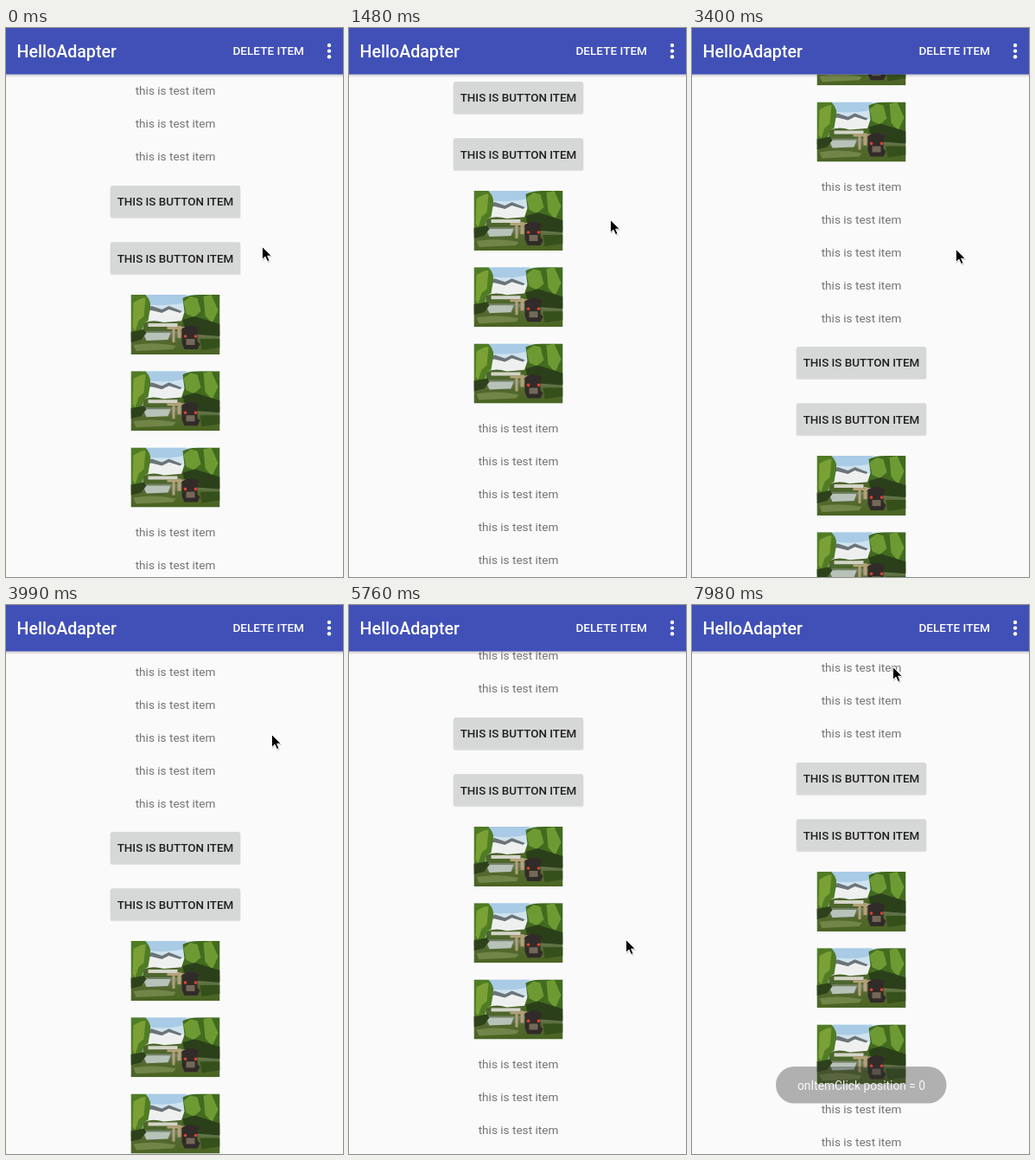
These frames come from a looping animation (390x634 px, 8 s). An HTML page:

```html
<!DOCTYPE html>
<html lang="en">
<head>
<meta charset="utf-8">
<title>HelloAdapter</title>
<style>
html, body { margin: 0; width: 100%; height: 100%; overflow: hidden; background: #fafafa; }
svg { display: block; width: 390px; height: 634px; font-family: Roboto, sans-serif; }
.item { font-size: 13.6px; fill: #747474; text-anchor: middle; }
.btn { font-size: 13.4px; font-weight: 500; fill: #1f1f1f; text-anchor: middle; }
</style>
</head>
<body>
<svg viewBox="0 0 390 634">
  <defs>
    <linearGradient id="shade" x2="0" y2="1">
      <stop offset="0" stop-color="#000" stop-opacity=".2"/>
      <stop offset="1" stop-color="#000" stop-opacity="0"/>
    </linearGradient>
    <linearGradient id="water" x2="0" y2="1">
      <stop offset="0" stop-color="#75836a"/>
      <stop offset=".4" stop-color="#53682f"/>
      <stop offset="1" stop-color="#4a6422"/>
    </linearGradient>
    <clipPath id="frame"><path d="M0 0h103v69h-103z"/></clipPath>
    <clipPath id="page"><path d="M0 53.5h390v581h-390z"/></clipPath>
    <g id="photo" clip-path="url(#frame)">
      <path d="M0 0h103v69h-103z" fill="#cfe2ee"/>
      <path d="M18 0h46v9q-22 5-46 2z" fill="#a9cbe6"/>
      <path d="M16 19l8-5 12 3 8-4 20 9v14h-48z" fill="#eef0f0"/>
      <path d="M17 19l7-6 12 4 8-4 15 6-2 2-13-4-8 4-12-3z" fill="#6b7478"/>
      <path d="M14 33q10-5 24-1l24-2v13h-48z" fill="#4d662c"/>
      <path d="M20 33h34v4h-34z" fill="#d3d4c8"/>
      <path d="M0 42h103v27h-103z" fill="url(#water)"/>
      <path d="M14 44h32l-3 8-25 1z" fill="#b8c2b9"/>
      <path d="M0 0h17q8 9 5 18l-2 12-5 3-4 14-11 2z" fill="#507c24"/>
      <path d="M3 9q10-6 14-5l-2 21-6 5-4 12-3-4z" fill="#7ba036"/>
      <path d="M0 43l15-3 3 4-6 8-12 3z" fill="#2d421a"/>
      <path d="M60 4q7-4 20-4h23v46h-41l-4-14 4-12z" fill="#426b1f"/>
      <path d="M61 8l8-6 8 2 4 15-8 7-9-4zM84 2l9-2 8 18-7 15-8-9z" fill="#6e9a33"/>
      <path d="M60 29l14-4 29 9v14l-40-3z" fill="#2b401a"/>
      <path d="M42 37h22v3h-22zM48 38h3v17h-3zM54 36h4v14h-4z" fill="#b3a079"/>
      <path d="M59 39q10-7 20 0l-2 4v11l3 3-3 6h-15l-3-7z" fill="#312b29"/>
      <path d="M64 51h10v7h-10z" fill="#746858"/>
      <circle cx="63" cy="48" r="1.8" fill="#dc4530"/>
      <circle cx="75" cy="48" r="1.8" fill="#dc4530"/>
      <path d="M80 51h23v10l-21 3z" fill="#36501b"/>
      <path d="M3 58q24-4 49 1l-3 4-43 2z" fill="#728548"/>
    </g>
  </defs>
  <rect width="390" height="634" fill="#fafafa"/>
  <g clip-path="url(#page)">
    <g id="list"></g>
    <path id="topGlow" fill="#3f51b5"/>
    <path id="endGlow" fill="#3f51b5"/>
  </g>
  <rect y="53" width="390" height="4.5" fill="url(#shade)"/>
  <rect width="390" height="53.5" fill="#4150b7"/>
  <g fill="#fff" font-weight="500">
    <text x="12.5" y="34" font-size="19.6">HelloAdapter</text>
    <text x="345" y="31.3" font-size="13.6" text-anchor="end">DELETE ITEM</text>
    <circle cx="374" cy="20" r="2.2"/>
    <circle cx="374" cy="26.6" r="2.2"/>
    <circle cx="374" cy="33.2" r="2.2"/>
  </g>
  <g id="toast" visibility="hidden">
    <rect x="97" y="533" width="197.5" height="42.5" rx="21.2" fill="#323232" fill-opacity=".37"/>
    <text x="196" y="560" font-size="13.8" fill="#fff" fill-opacity=".9" text-anchor="middle">onItemClick position = 0</text>
  </g>
  <g id="cursor">
    <path d="M1 1.5v15.5l3.7-3.3 2.6 5.6 2.6-1.2-2.5-5.3h5z" opacity=".18"/>
    <path d="M.5.5v14.8l3.5-3.2 2.5 5.5 2.5-1.1-2.4-5.3h4.7z" stroke="#fff" stroke-width=".9"/>
  </g>
</svg>
<script>
(() => {
  const LOOP = 8000, STEP = 147.4, MAX_SCROLL = 515;
  const el = id => document.getElementById(id);
  const clamp = (v, lo, hi) => Math.min(Math.max(v, lo), hi);

  const rows = {
    t: { h: 38, draw: y => `<text class="item" x="196" y="${y + 23.4}">this is test item</text>` },
    b: { h: 65.25, draw: y => `
      <rect x="120.5" y="${y + 15}" width="151" height="37" rx="2.5" opacity=".1"/>
      <rect x="121" y="${y + 14}" width="150" height="36.6" rx="2" fill="#d6d7d7"/>
      <text class="btn" x="196" y="${y + 37.3}">THIS IS BUTTON ITEM</text>` },
    i: { h: 88.2, draw: y => `<use href="#photo" x="144.5" y="${y + 9.5}"/>` }
  };

  let rowY = 54, markup = '';
  for (const kind of 'tttbbiiitttttbbiii') {
    markup += rows[kind].draw(rowY);
    rowY += rows[kind].h;
  }
  el('list').innerHTML = markup;

  // Pointer stops: tick, x, y, and whether it drags the list on to the next stop
  const stops = [
    [-5, 296, 252], [-2, 305, 350], [-1, 305, 350],
    [0, 305, 341, true], [4, 302, 221, true], [6, 300, 172],
    [8, 300, 323, true], [11, 294, 190, true], [12, 296, 146],
    [15, 304, 308, true], [21, 307, 149, true], [22, 307, 139],
    [25, 306, 600, true], [28, 305, 432, true], [30, 305, 622],
    [36, 335, 150], [39, 343, 253], [45, 232, 71]
  ];
  const FLING = 30, FLING_TICKS = 5;

  // Walks the stops up to a tick; dragging moves the list with the pointer
  function pose(tick) {
    let [, x, y] = stops[0], scroll = 0;
    for (let n = 1; n < stops.length && stops[n - 1][0] < tick; n++) {
      const [t0, x0, y0, drag] = stops[n - 1], [t1, x1, y1] = stops[n];
      const p = Math.min((tick - t0) / (t1 - t0), 1);
      x = x0 + (x1 - x0) * p;
      y = y0 + (y1 - y0) * p;
      if (drag) scroll = clamp(scroll + y0 - y, 0, MAX_SCROLL);
    }
    scroll *= (1 - clamp((tick - FLING) / FLING_TICKS, 0, 1)) ** 2;
    return { x, y, scroll };
  }

  // Grows while the list is pulled past its edge, then recedes over four ticks
  const pull = (tick, from, to) =>
    .4 * clamp(Math.min((tick - from) / (to - from), 1 - (tick - to) / 4), 0, 1);

  // A squashed slice of a large circle leaning towards the pointer
  function glow(node, edge, dir, size, px) {
    const r = 585, cx = 195 + (px - 195) / 2;
    let d = `M0 ${edge}`;
    for (let x = 0; x <= 390; x += 10) {
      const drop = Math.sqrt(r * r - (x - cx) ** 2) - r * Math.cos(Math.PI / 6);
      d += `L${x} ${edge + dir * size * Math.max(drop, 0)}`;
    }
    node.setAttribute('d', d + `L390 ${edge}Z`);
    node.setAttribute('opacity', size * .45);
  }

  function render(ms) {
    const tick = Math.floor((ms - 888) / STEP);
    const { x, y, scroll } = pose(tick);
    el('list').setAttribute('transform', `translate(0 ${-scroll})`);
    el('cursor').setAttribute('transform', `translate(${x} ${y})`);
    glow(el('topGlow'), 54, 1, pull(tick, 36, 39), x);
    glow(el('endGlow'), 634, -1, pull(tick, 25, 28), x);
    el('toast').setAttribute('visibility', ms >= 7975 ? 'visible' : 'hidden');
  }

  function loop() {
    render(performance.now() % LOOP);
    requestAnimationFrame(loop);
  }
  loop();
})();
</script>
</body>
</html>
```
